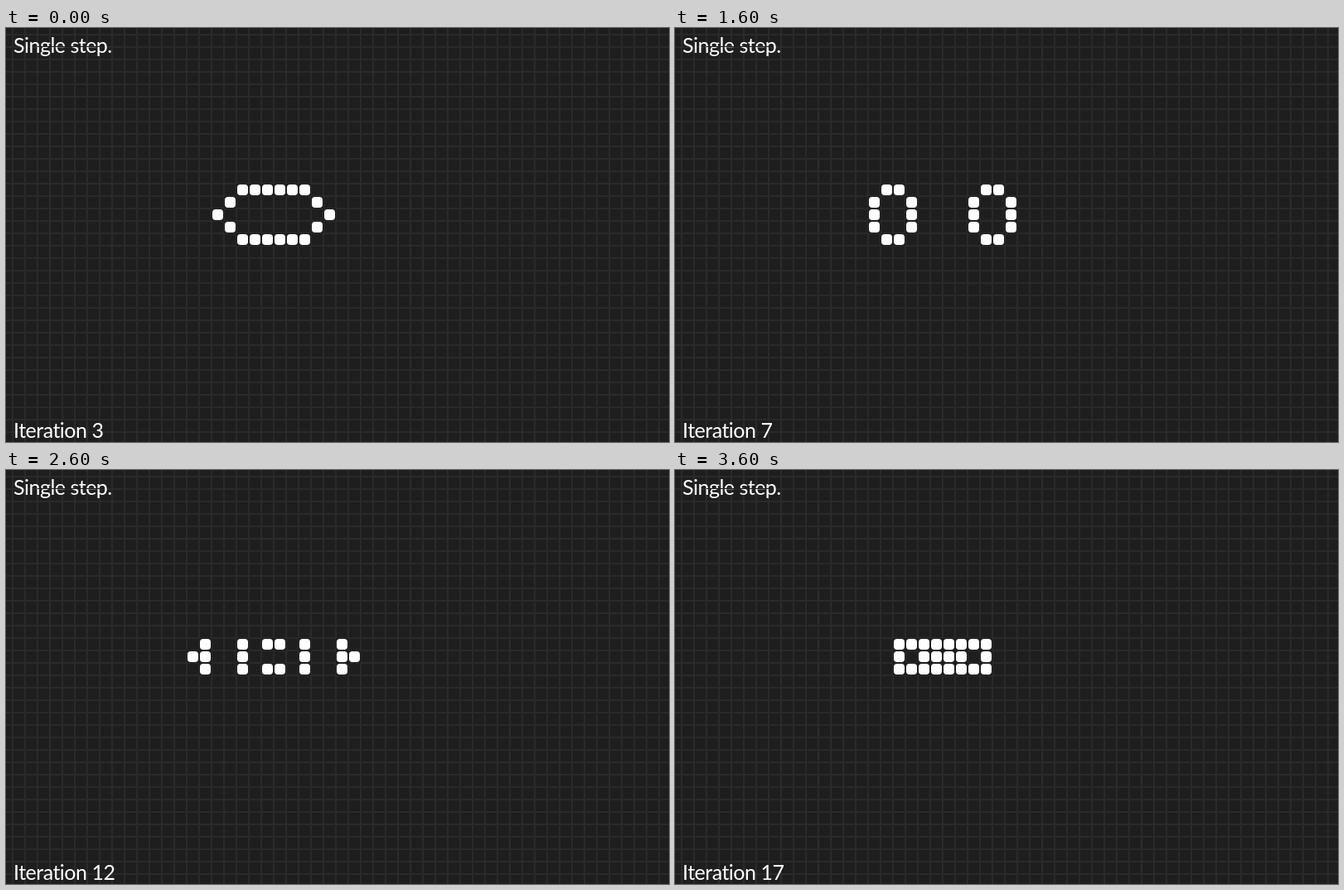
Write an HTML page with a canvas that moves like this. It is 800 px wide and 500 px high and loops after 3.8 s.

```html
<!DOCTYPE html>
<html lang="en">
<head>
<meta charset="utf-8">
<title>Single step</title>
<style>
  html, body { margin: 0; width: 100%; height: 100%; overflow: hidden; background: #1e1e1e; }
  canvas { display: block; }
</style>
</head>
<body>
<canvas id="stage" width="800" height="500"></canvas>
<script>
const ctx = document.getElementById('stage').getContext('2d');
const W = 800, H = 500, CELL = 15, OFFSET = 8;
const FIRST = 3, LAST = 17, HOLD = 1000, STEP = 200, LOOP = 3800;
const SEED = [
  '..######..',
  '.#......#.',
  '#........#',
  '.#......#.',
  '..######..',
];
const SEED_COL = 16, SEED_ROW = 12;

const key = (col, row) => col + row * 100;

function nextGeneration(cells) {
  const counts = new Map();
  for (const cell of cells) {
    for (let dy = -1; dy <= 1; dy++) {
      for (let dx = -1; dx <= 1; dx++) {
        if (!dx && !dy) continue;
        const near = cell + key(dx, dy);
        counts.set(near, (counts.get(near) || 0) + 1);
      }
    }
  }
  const next = new Set();
  for (const [cell, n] of counts) {
    if (n === 3 || (n === 2 && cells.has(cell))) next.add(cell);
  }
  return next;
}

function seedCells() {
  const cells = new Set();
  SEED.forEach((line, row) => [...line].forEach((c, col) => {
    if (c === '#') cells.add(key(SEED_COL + col, SEED_ROW + row));
  }));
  return cells;
}

const generations = [seedCells()];
while (generations.length <= LAST - FIRST) {
  generations.push(nextGeneration(generations[generations.length - 1]));
}

function drawGrid() {
  ctx.fillStyle = '#1e1e1e';
  ctx.fillRect(0, 0, W, H);
  ctx.fillStyle = '#2a2a2a';
  for (let x = OFFSET - 1; x < W; x += CELL) ctx.fillRect(x, 0, 2, H);
  for (let y = OFFSET - 1; y < H; y += CELL) ctx.fillRect(0, y, W, 2);
}

function drawCell(cell) {
  const x = OFFSET + (cell % 100) * CELL;
  const y = OFFSET + Math.floor(cell / 100) * CELL;
  ctx.fillStyle = '#1e1e1e';
  ctx.fillRect(x, y, CELL, CELL);
  ctx.fillStyle = '#fff';
  ctx.beginPath();
  ctx.roundRect(x + 1, y + 1, CELL - 2, CELL - 2, 4);
  ctx.fill();
}

function drawText(text, baseline) {
  ctx.fillStyle = '#fff';
  ctx.font = '400 25px Lato, sans-serif';
  ctx.letterSpacing = '-0.5px';
  ctx.fillText(text, 9, baseline);
}

function draw(time) {
  const t = time % LOOP;
  const step = t < HOLD ? 0 : 1 + Math.floor((t - HOLD) / STEP);
  drawGrid();
  generations[step].forEach(drawCell);
  drawText('Single step.', 30);
  ctx.fillStyle = '#1e1e1e';
  ctx.fillRect(38, 22, 80, 1);
  drawText('Iteration ' + (FIRST + step), 495);
}

function frame() {
  draw(performance.now());
  requestAnimationFrame(frame);
}
frame();
</script>
</body>
</html>
```
